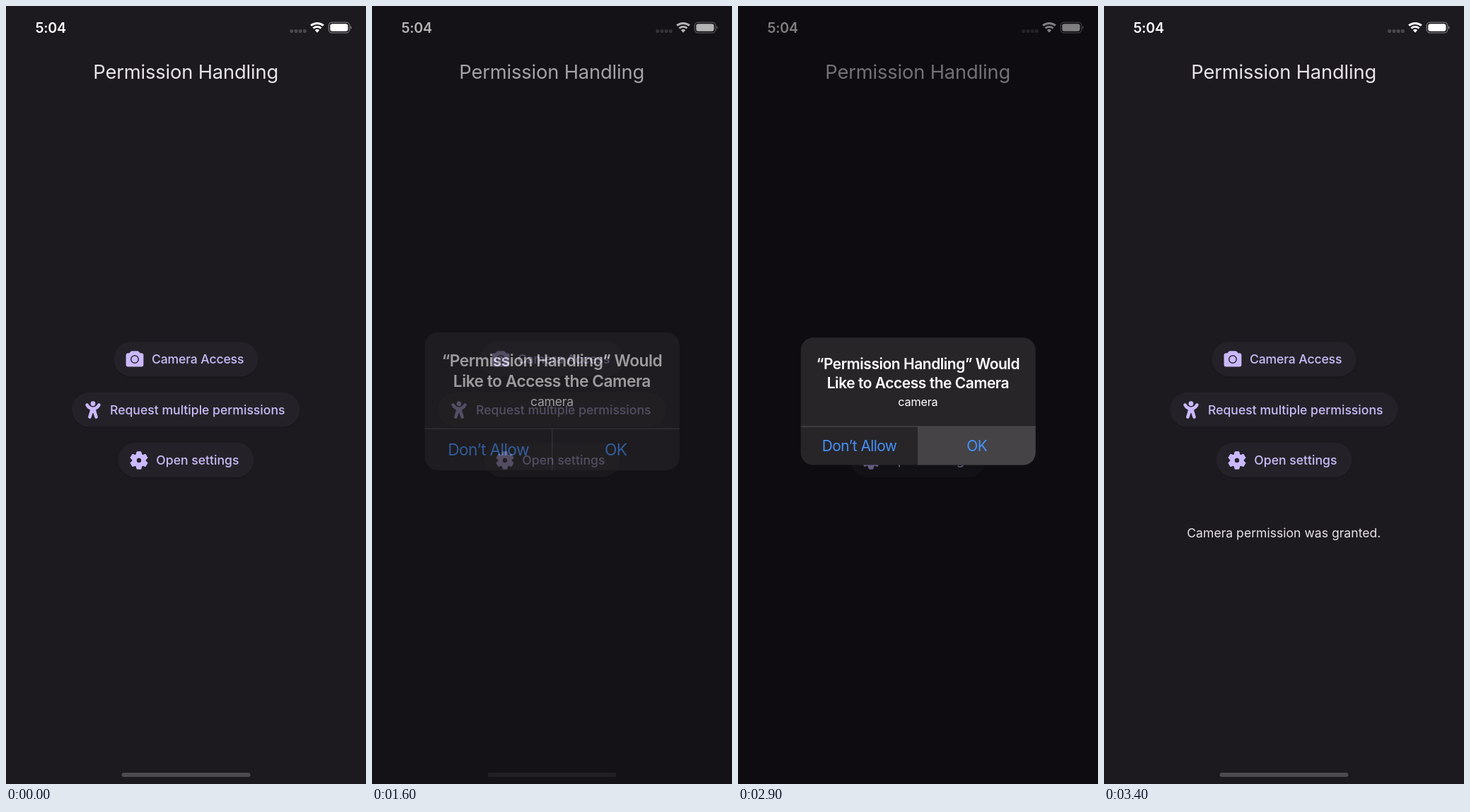
Recreate the animation shown at these times as an HTML page. Size 509 px wide and 1101 px high, loop 3450 ms.

```html
<!DOCTYPE html>
<html lang="en">
<head>
<meta charset="utf-8">
<title>Permission Handling</title>
<style>
  html, body { margin: 0; width: 100%; height: 100%; overflow: hidden; background: #1c191f; }
  svg { display: block; width: 100%; height: 100%; }
  text { font-family: Inter, "Open Sans", sans-serif; }
  .mid { text-anchor: middle; }
  .label { font-size: 17.6px; font-weight: 500; fill: #cbbcfa; }
  .icon { fill: #cbb9fe; }
  .heading { font-size: 21px; font-weight: 600; fill: #fff; letter-spacing: -.47px; }
  .action { font-size: 21px; fill: #4690f8; letter-spacing: -.6px; }
</style>
</head>
<body>
<svg viewBox="0 0 509 1101" xmlns="http://www.w3.org/2000/svg">
  <defs>
    <clipPath id="pillClip"><rect x="152.5" y="475.5" width="204" height="49" rx="24.5"/></clipPath>
    <clipPath id="panelClip"><rect x="88.7" y="469.3" width="332" height="180.3" rx="17.5"/></clipPath>
  </defs>
  <rect width="509" height="1101" fill="#1c191f"/>

  <!-- Status bar -->
  <text x="41.6" y="37.7" font-size="19.7" font-weight="600" letter-spacing="-.3" fill="#fff">5:04</text>
  <g id="signal" fill="#4a484d"></g>
  <g id="wifi" fill="none" stroke="#fff"></g>
  <rect x="456.2" y="23.2" width="29.6" height="14.6" rx="4.6" fill="none" stroke="#fff" stroke-opacity=".42" stroke-width="1.2"/>
  <rect x="458.3" y="25.3" width="25.2" height="10.4" rx="2.9" fill="#fff"/>
  <path d="M487 28.2q1.6.6 1.6 2.3t-1.6 2.3z" fill="#fff" fill-opacity=".45"/>

  <text class="mid" x="254.2" y="103" font-size="27.3" letter-spacing="-.15" fill="#e8e4e8">Permission Handling</text>

  <!-- Buttons -->
  <g id="pills"></g>
  <g clip-path="url(#pillClip)"><circle id="ripple" cy="501" fill="#cbbcfa"/></g>

  <g class="icon">
    <path d="M178.3 488.2h7.4q1.2 0 2 .9l2 2.2h1.7q3 0 3 3v13.2q0 3-3 3h-18.8q-3 0-3-3v-13.2q0-3 3-3h1.7l2-2.2q.8-.9 2-.9z"/>
    <circle cx="182" cy="500" r="5.3" fill="none" stroke="#2b2733" stroke-width="1.5"/>
  </g>
  <g class="icon">
    <circle cx="123" cy="562.7" r="3.4"/>
    <path d="M118.8 569h8.4v7h-8.4z"/>
    <g fill="none" stroke="#cbb9fe" stroke-width="4.6" stroke-linecap="round">
      <path d="M114.6 564.6Q117.5 569.8 123 569.8T131.4 564.6"/>
      <path d="M121.1 573L118.4 581.6M124.9 573L127.6 581.6"/>
    </g>
  </g>
  <g id="gear" class="icon" transform="translate(188 643)"><circle r="9.6"/></g>

  <text class="label" x="206" y="506.4" letter-spacing="-.15">Camera Access</text>
  <text class="label" x="147" y="577.7">Request multiple permissions</text>
  <text class="label" x="212.3" y="649">Open settings</text>

  <text id="result" class="mid" x="254.3" y="752.2" font-size="17.6" fill="#e8e4e8">Camera permission was granted.</text>
  <rect id="homeBar" x="163.5" y="1085" width="182" height="6" rx="3" fill="#4d4b4f"/>

  <rect id="dim" width="509" height="1101" fill="#000003"/>

  <!-- Alert -->
  <g id="panel">
    <g clip-path="url(#panelClip)">
      <rect x="88" y="469" width="333" height="181" fill="#272528"/>
      <path d="M254.8 595V650" stroke="#515053"/>
      <rect id="pressed" x="254.4" y="595" width="167" height="55" fill="#454346"/>
      <path d="M88 595.2H421" stroke="#515053"/>
    </g>
    <text class="mid heading" x="254.4" y="514">“Permission Handling” Would</text>
    <text class="mid heading" x="254.4" y="541">Like to Access the Camera</text>
    <text class="mid" x="254.4" y="565.6" font-size="16.2" letter-spacing="-.2" fill="#fff">camera</text>
    <text class="mid action" x="171.6" y="630.2">Don’t Allow</text>
    <text class="mid action" x="337.7" y="630.2">OK</text>
  </g>
</svg>
<script>
const LOOP = 3450, STEP = 50;
const PRESS = 1350, OPEN = 1515, TAP_OK = 2900, CLOSE = 2990, GRANTED = 3050;
const CENTER = [254.7, 559.5];
const $ = id => document.getElementById(id);

function add(parent, tag, attrs) {
  const node = document.createElementNS('http://www.w3.org/2000/svg', tag);
  set(node, attrs);
  parent.appendChild(node);
}
function set(node, attrs) {
  for (const key in attrs) node.setAttribute(key, attrs[key]);
}

for (let i = 0; i < 4; i++)
  add($('signal'), 'rect', { x: 401.4 + 6.2 * i, y: 33.2, width: 4.7, height: 4.7, rx: 1.3 });

// Wi-Fi bands: wedges around a common lower point
for (const [radius, width] of [[13.4, 3], [8.4, 2.9], [2.4, 4.8]]) {
  const dx = radius * Math.sin(.72), dy = radius * Math.cos(.72);
  add($('wifi'), 'path', {
    d: `M${440 - dx} ${37.8 - dy}A${radius} ${radius} 0 0 1 ${440 + dx} ${37.8 - dy}`,
    'stroke-width': width
  });
}

for (const [x, y, width] of [[152.5, 475.5, 204], [93.2, 546.8, 322.4], [158.7, 618, 191.8]]) {
  const box = { x, width, height: 49, rx: 24.5 };
  add($('pills'), 'rect', { ...box, y: y + 1.2, fill: '#000', 'fill-opacity': .22 });
  add($('pills'), 'rect', { ...box, y, fill: '#242228' });
}

for (let a = 0; a < 360; a += 60)
  add($('gear'), 'path', {
    d: 'M-2.8-12.2H2.8L4.2-7H-4.2z', transform: `rotate(${a})`,
    stroke: '#cbb9fe', 'stroke-width': 1, 'stroke-linejoin': 'round'
  });
add($('gear'), 'circle', { r: 3.2, fill: '#242228' });

const clamp = v => Math.min(1, Math.max(0, v));

// Share still to go on a critically damped spring
function remaining(ms) {
  if (ms <= 0) return 1;
  const p = 22.8 * ms / 1000, rest = (1 + p) * Math.exp(-p);
  return rest < .001 ? 0 : rest;
}

function draw(t) {
  const entering = remaining(t - OPEN);
  const shown = t < CLOSE ? 1 - entering : remaining(t - CLOSE);
  const scale = 1 + .2 * entering;

  const grow = 1 - (1 - clamp((t - PRESS) / 110)) ** 2;
  set($('ripple'), {
    cx: 222.5 + 32 * grow,
    r: 61.5 + 48 * grow,
    opacity: t < PRESS ? 0 : .125 * (1 - clamp((t - 1450) / 175))
  });

  set($('dim'), { opacity: .5 * shown });
  set($('homeBar'), { opacity: t < CLOSE ? entering : clamp((t - CLOSE) / 220) });
  set($('panel'), {
    opacity: shown,
    transform: `translate(${CENTER}) scale(${scale}) translate(${CENTER.map(v => -v)})`
  });
  set($('pressed'), { opacity: t >= TAP_OK && t < CLOSE ? 1 : 0 });
  set($('result'), { opacity: t >= GRANTED ? 1 : 0 });
}

const start = performance.now();
function tick() {
  const t = (performance.now() - start) % LOOP;
  draw(Math.floor(t / STEP) * STEP);
  requestAnimationFrame(tick);
}
tick();
</script>
</body>
</html>
```
